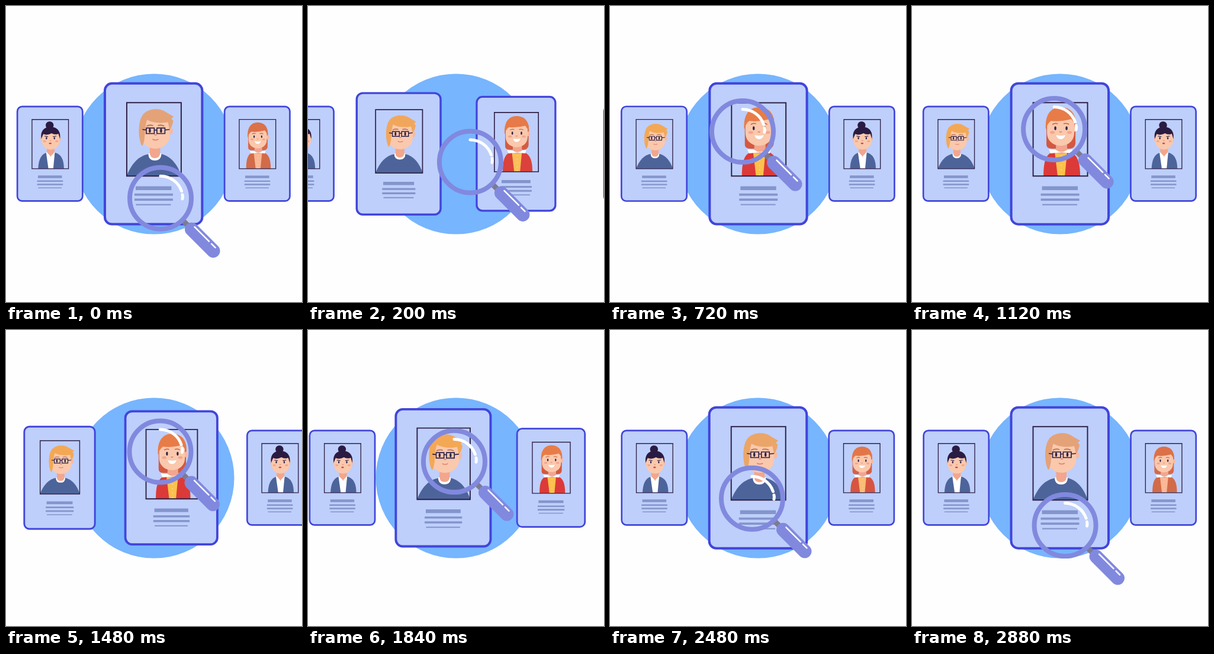
Write an HTML page that moves like this. It is 500 px wide and 500 px high and loops after 2920 ms.

```html
<!DOCTYPE html>
<html>
<head>
<meta charset="utf-8">
<style>
html, body { margin: 0; height: 100%; overflow: hidden; background: #fefefe; }
svg { display: block; width: 100vw; height: 100vh; }
</style>
</head>
<body>
<svg id="stage" viewBox="0 0 500 500" fill="none">
  <defs>
    <clipPath id="photo"><path d="M204.500 163.500H296.500V287H204.500Z"/></clipPath>

    <g id="sheet">
      <rect x="167.500" y="130.700" width="164.500" height="238" rx="12" fill="#becffb" stroke="#4145db" stroke-width="4"/>
      <path d="M219.500 304.500h60.500v6.500h-60.500zM217.500 316.800h65v3.700h-65zM217.500 325.300h65v3.700h-65zM220 334.500h59v2.200h-59z" fill="#8495cc"/>
    </g>
    <path id="frame" d="M204.500 163.300H296.500V287.300H204.500Z" stroke="#2e2148" stroke-width="2"/>

    <g id="man">
      <use href="#sheet"/>
      <g clip-path="url(#photo)">
        <path d="M204 288C213 265 225 253 242 250H263C280 254 291 269 297 288Z" fill="#4d649b"/>
        <path d="M241 249Q241 261 252 261T263 249" fill="#fff"/>
        <path d="M243.500 234H261V249Q260 257 252 257T243.500 249Z" fill="#f2a68d"/>
        <ellipse cx="278" cy="211" rx="4.500" ry="6" fill="#f8b99e"/>
        <path d="M230 193V222C230 234 242 241 253 241S277 233 277 220V193Z" fill="#fac8ac"/>
        <path d="M230 236C223 222 223 193 233 182C243 172 262 172 272 180L284 187L280 190L283 194Q282 203 277 209L274 196C262 199 246 197 239 192C234 203 237 226 231 236Z" fill="var(--hair)"/>
        <path d="M238 203q5-3 11-1M257 202q6-2 11 1" stroke="#b9744f" stroke-width="1.800"/>
        <path d="M237.500 206h13.500v9.500h-13.500zM255.500 206h13.500v9.500h-13.500zM251 209.500h4.500M231 208.500l6.500 1M269 209.500l8-1" stroke="#2e2148" stroke-width="1.700"/>
        <ellipse cx="243.500" cy="210.500" rx="1.700" ry="3.700" fill="#2e2148"/>
        <ellipse cx="262.500" cy="210.500" rx="1.700" ry="3.700" fill="#2e2148"/>
        <path d="M251 217q2 2 4 0M248 225q5 3 10 0" stroke="#dd806d" stroke-width="1.500"/>
      </g>
      <use href="#frame"/>
    </g>

    <g id="redhead">
      <use href="#sheet"/>
      <g clip-path="url(#photo)">
        <path d="M227 197V234Q227 241 236 241H267Q277 240 276 228V190Z" fill="var(--back)"/>
        <path d="M222 288C222 260 227 249 240 246H264C279 249 284 263 284 288Z" fill="var(--coat)"/>
        <path d="M241 246H262L258 288H246Z" fill="var(--vest)"/>
        <path d="M243 230H262V246Q252 254 243 246Z" fill="#f2a68d"/>
        <path d="M231 242L243 243Q252 250 262 243L271 242L269 249L253 247L234 249Z" fill="#fff"/>
        <path d="M252 252v34" stroke="#fff" stroke-opacity=".6" stroke-dasharray="2 6"/>
        <ellipse cx="276" cy="208" rx="3.500" ry="5" fill="#f8b99e"/>
        <path d="M228 192V214C228 229 240 236 251 236S274 229 274 214V190Z" fill="#fac8ac"/>
        <path d="M226 209C224 184 234 171 251 171C268 171 278 182 277 204Q274 197 269 191Q250 196 235 194Q229 197 226 209Z" fill="var(--red)"/>
        <path d="M237 200q5-3 9-1M256 199q5-2 9 1" stroke="#c9653f" stroke-width="1.600"/>
        <ellipse cx="242" cy="206.500" rx="1.700" ry="3.300" fill="#2e2148"/>
        <ellipse cx="261" cy="206.500" rx="1.700" ry="3.300" fill="#2e2148"/>
        <ellipse cx="237" cy="213.500" rx="4" ry="2.300" fill="#f5a48d"/>
        <ellipse cx="266" cy="213.500" rx="4" ry="2.300" fill="#f5a48d"/>
        <path d="M249 212q2 2 4 0" stroke="#dd806d" stroke-width="1.400"/>
        <path d="M243.500 218Q251 220 259 218Q257 225 251 225T243.500 218Z" fill="#fff"/>
      </g>
      <use href="#frame"/>
    </g>

    <g id="bun">
      <use href="#sheet"/>
      <g clip-path="url(#photo)">
        <circle cx="249" cy="178" r="10" fill="#2a1b43"/>
        <path d="M220 288C221 263 228 251 241 247H263C278 251 285 264 285 288Z" fill="#4d649b"/>
        <path d="M240 246H262L258 288H246Z" fill="#fff"/>
        <path d="M242 233H261V246L252 258L242 246Z" fill="#f2a68d"/>
        <path d="M241 245L251 256L246 273ZM262 245L252 256L258 273Z" fill="#fff"/>
        <ellipse cx="229" cy="212" rx="3" ry="5" fill="#f8b99e"/>
        <ellipse cx="274" cy="212" rx="3" ry="5" fill="#f8b99e"/>
        <path d="M229 194V216C229 231 240 239 251.500 239S274 231 274 216V194Z" fill="#fac8ac"/>
        <path d="M228 212C225 193 234 182 251 182S278 193 275 212L271 199Q263 203 254 198Q243 204 233 200Z" fill="#2a1b43"/>
        <path d="M236 205l9 1.500M257 206.500l9-1.500" stroke="#2e2148" stroke-width="1.600"/>
        <ellipse cx="241" cy="210.500" rx="1.700" ry="3.200" fill="#2e2148"/>
        <ellipse cx="261" cy="210.500" rx="1.700" ry="3.200" fill="#2e2148"/>
        <ellipse cx="236" cy="218" rx="4" ry="2.300" fill="#f5a48d"/>
        <ellipse cx="267" cy="218" rx="4" ry="2.300" fill="#f5a48d"/>
        <path d="M249 216q2 2 4 0" stroke="#dd806d" stroke-width="1.400"/>
        <ellipse cx="250.500" cy="223.500" rx="3.500" ry="2" fill="#cf4a4a"/>
      </g>
      <use href="#frame"/>
    </g>
  </defs>

  <circle cx="250" cy="250" r="135.500" fill="#77b5fe"/>
  <use id="bunLeft" href="#bun"/>
  <use id="bunRight" href="#bun"/>
  <use id="manCard" href="#man"/>
  <use id="redCard" href="#redhead"/>
  <g id="lens" stroke-linecap="round">
    <path d="M38 38L48 48" stroke="#7d7b90" stroke-width="9" stroke-linecap="butt"/>
    <circle r="52" stroke="#8189de" stroke-width="8"/>
    <path d="M52.500 52.500L89 89" stroke="#8189de" stroke-width="23"/>
    <path d="M57.500 48.500L82 73M86 77L92.500 83.500" stroke="#fff" stroke-width="2.500"/>
    <path d="M0-37.500A37.500 37.500 0 0 1 35.500-12M37-6Q38-3 37 1" stroke="#fff" stroke-width="5"/>
  </g>
</svg>
<script>
const LOOP = 2920, MOVE = 480, BACK = 1400, MID = 249.5, SIDE = 0.67;
const el = id => document.getElementById(id);
const clamp = v => Math.min(1, Math.max(0, v));

// Lens centre: time, x, y
const path = [
  [0, 261, 325], [440, 279, 202], [720, 224, 212], [1480, 260.5, 205.5],
  [1840, 247, 222], [2120, 230.5, 248.5], [2800, 253, 318], [2880, 258.5, 330]
];

// Linear move followed by a decaying wobble
function spring(ms) {
  if (ms < MOVE) return clamp(ms / MOVE);
  const s = (ms - MOVE) / 1000;
  return 1 + 0.1 * Math.sin(8 * Math.PI * s) * Math.exp(-7 * s);
}

function key(i) {
  const n = path.length, [t, x, y] = path[(i + n) % n];
  return [t + Math.floor(i / n) * LOOP, x, y];
}

function lensAt(t) {
  const i = path.findLastIndex(p => p[0] <= t);
  const [a, b, c, d] = [-1, 0, 1, 2].map(k => key(i + k));
  const span = c[0] - b[0], u = (t - b[0]) / span;
  return [1, 2].map(k => {
    const m = (c[k] - a[k]) / (c[0] - a[0]) * span;
    const n = (d[k] - b[k]) / (d[0] - b[0]) * span;
    const rise = c[k] - b[k];
    return b[k] + u * (m + u * (3 * rise - 2 * m - n + u * (m + n - 2 * rise)));
  });
}

function place(id, x, size) {
  const s = SIDE + (1 - SIDE) * size;
  el(id).setAttribute("transform", `translate(${x} ${MID}) scale(${s}) translate(${-MID} ${-MID})`);
}

function draw(now) {
  const t = now % LOOP;
  const u = t < BACK ? spring(t) : 1 - spring(t - BACK);
  const v = 1 - u;
  place("bunLeft", 74.5 - 206 * u, 0);
  place("bunRight", 424.3 + 225 * v, 0);
  place("manCard", 74 + 175.5 * (0.46 * v + 0.54 * v * v), v);
  place("redCard", MID + 175 * v, u);
  el("lens").setAttribute("transform", `translate(${lensAt(t)})`);

  // Warm colours fade while the first card rests
  const dull = 100 * Math.max(clamp((t - 2160) / 600), 1 - clamp(t / 240));
  const tint = (name, a, b) =>
    el("stage").style.setProperty("--" + name, `color-mix(in srgb, ${b} ${dull}%, ${a})`);
  tint("hair", "#f3a855", "#e4a278");
  tint("coat", "#dc3a38", "#d26b48");
  tint("vest", "#fbc14c", "#fab795");
  tint("red", "#e87c48", "#dc7048");
  tint("back", "#d4583f", "#d6694a");
  requestAnimationFrame(draw);
}
draw(performance.now());
</script>
</body>
</html>
```
